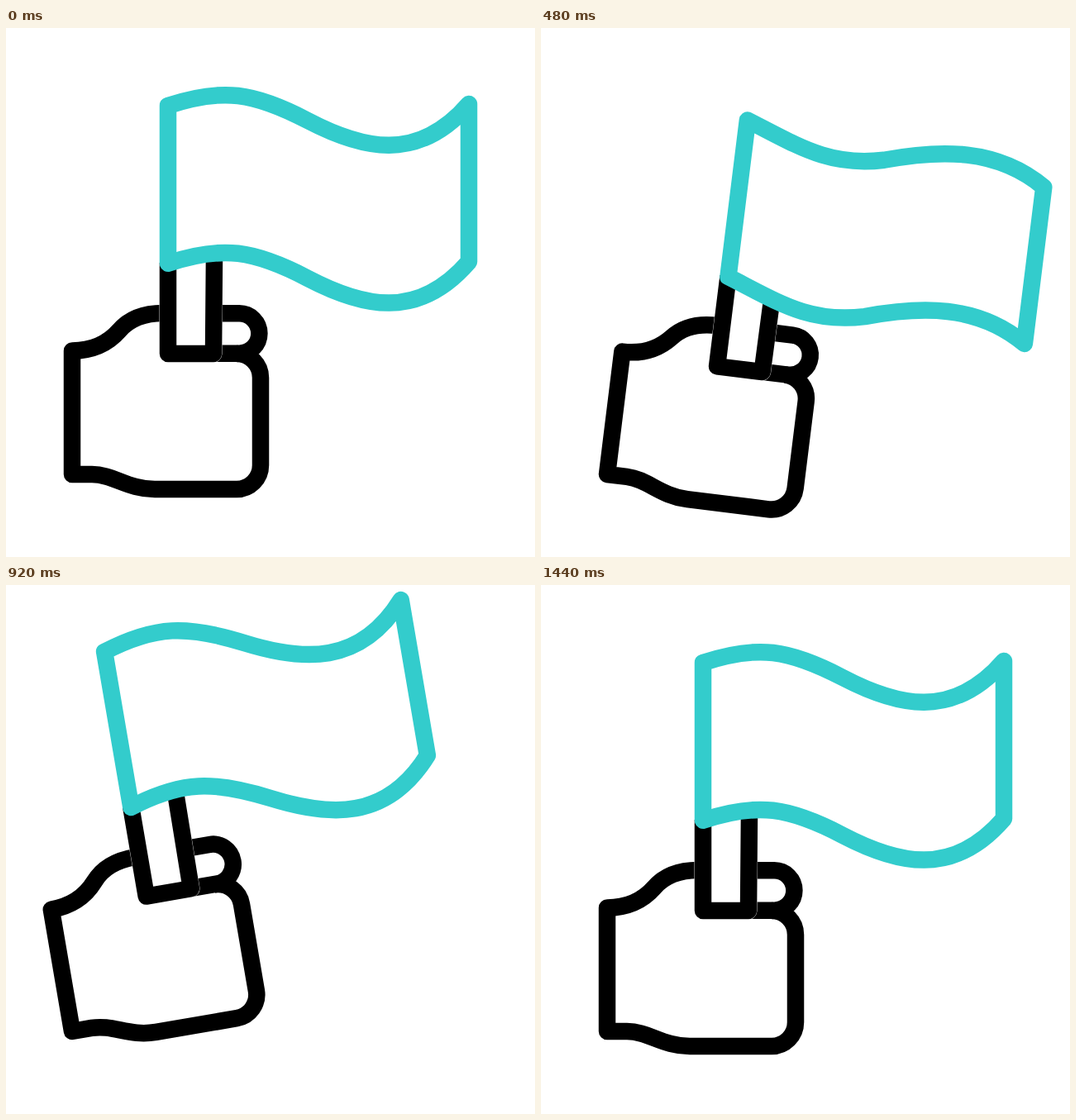
Recreate the animation shown at these times as an HTML page. Size 640x640 px, loop 1.48 s.

```html
<!DOCTYPE html>
<html lang="en">
<head>
<meta charset="utf-8">
<title>Waving flag</title>
<style>
  html, body { margin: 0; height: 100%; overflow: hidden; background: #fff; }
  svg { display: block; width: 100vw; height: 100vh; }
  path { fill: none; stroke: #000; stroke-width: 20.5; stroke-linejoin: round; }
  .gap { stroke: #fff; stroke-width: 21.1; }
  #flag { fill: #fff; stroke: #3cc; }
</style>
</head>
<body>
<svg viewBox="0 0 640 640">
  <g id="arm">
    <path d="M251 345.3H282.2a24.2 24.2 0 0 1 0 48.4H251"/>
    <path d="M190 345C167 345 149 352 137 366C123 382 105 390.5 80 390.5V540H104C130 540 147 558 180 558H279A29 29 0 0 0 308 529V423A29 29 0 0 0 279 394"/>
    <path class="gap" d="M196 284V394H251L252 276"/>
    <path d="M196 284V394H251L252 276"/>
    <path id="flag"/>
  </g>
</svg>
<script>
const STEP = 40, LOOP = 1480;
const POLE = 196, HEIGHT = 190.8;
const arm = document.getElementById('arm');
const flag = document.getElementById('flag');

const mix = (a, b, k) => a + (b - a) * k;

// Eased 0..1 between two steps
function ease(step, from, to) {
  const k = Math.min(1, Math.max(0, (step - from) / (to - from)));
  return k * k * (3 - 2 * k);
}

// Top edge as two joined cubics; wave 1 is the opposite ripple of wave 0
function topEdge(wave) {
  const at = (x, y0, y1) => [POLE + (x - POLE) * (1 + 0.005 * wave), mix(y0, y1, wave)];
  return [
    at(POLE, 94, 94), at(262, 72, 123), at(300, 78, 144),
    at(365, 112, 122.5),
    at(430, 146, 96), at(498, 164, 82), at(560, 92, 134.5)
  ];
}

function flagPath(wave) {
  const top = topEdge(wave);
  const bottom = top.map(([x, y]) => [x, y + HEIGHT]).reverse();
  const cubics = ([first, ...rest]) => `${first}C${rest.join(' ')}`;
  return `M${cubics(top)}L${cubics(bottom)}Z`;
}

function draw(ms) {
  // The first pose is held for two steps
  const step = Math.max(0, Math.floor((ms % LOOP) / STEP + 0.05) - 1);
  const right = ease(step, 0, 8.1);
  const left = ease(step, 8.1, 23.1);
  const home = ease(step, 23.1, 33.7);
  const angle = 8.9 * right - 18.9 * left + 10 * home;
  arm.setAttribute('transform', `rotate(${angle} 80 540)`);
  flag.setAttribute('d', flagPath(right - left));
}

const start = performance.now();
function tick() {
  draw(performance.now() - start);
  requestAnimationFrame(tick);
}
tick();
</script>
</body>
</html>
```
